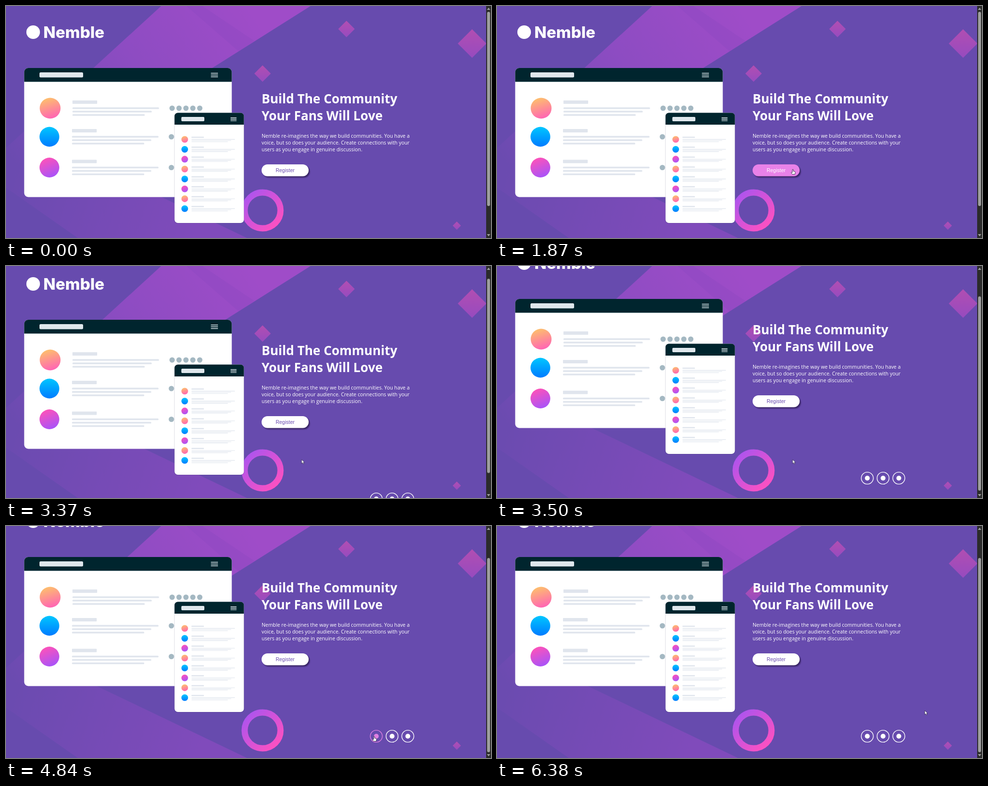
An HTML page that plays this animation: 1000 by 479 pixels, repeating every 6.44 s.

```html
<!DOCTYPE html>
<html lang="en">
<head>
<meta charset="utf-8">
<title>Community landing page</title>
<style>
  html, body { margin: 0; width: 100%; height: 100%; overflow: hidden; background: #674bae; }
  svg { display: block; width: 100%; height: 100%; }
  text { font-family: "Open Sans", sans-serif; fill: #fff; }
  .brand { font: 800 33px Inter, sans-serif; }
  .title { font-size: 26px; font-weight: 700; }
  .copy { font-size: 10.4px; font-weight: 500; }
  .label { font: 10.5px "Liberation Sans", Arial, sans-serif; fill: currentColor; }

  .page, .thumb, .pointer, .arrow, .hand, .button, .label, .icon {
    animation: 6440ms linear infinite;
  }
  .page { --k: -1; }
  .thumb { --k: .845; }
  .page, .thumb { animation-name: scroll; animation-timing-function: step-end; }
  .pointer { animation-name: move; }
  .arrow, .hand { animation-timing-function: step-end; }
  .arrow { animation-name: arrow; }
  .hand { animation-name: hand; }
  .button { animation-name: press; fill: #fff; }
  .label { animation-name: press-label; color: #694baf; }
  .icon { color: #fff; }
  .icon:nth-child(1) { animation-name: first; }
  .icon:nth-child(2) { animation-name: second; }
  .icon:nth-child(3) { animation-name: third; }

  @keyframes scroll {
    0% { transform: translateY(0); }
    51.55% { transform: translateY(calc(5px * var(--k))); }
    52.32% { transform: translateY(calc(17px * var(--k))); }
    52.79% { transform: translateY(calc(29px * var(--k))); }
    53.26% { transform: translateY(calc(41px * var(--k))); }
    53.72% { transform: translateY(calc(52px * var(--k))); }
    54.34% { transform: translateY(calc(60px * var(--k))); }
    55.9%, 100% { transform: translateY(calc(64px * var(--k))); }
  }
  @keyframes move {
    0%, 15.53% { transform: translate(720px, 479px); }
    24.53%, 39.44% { transform: translate(610px, 337px); }
    45.18%, 63.04% { transform: translate(609.5px, 399.5px); }
    72.05% { transform: translate(757px, 432px); }
    75.1%, 77.6% { transform: translate(759px, 434px); }
    82.6%, 85.1% { transform: translate(795px, 435px); }
    90.06%, 93.2% { transform: translate(827px, 434px); }
    99.06%, 100% { transform: translate(882px, 381px); }
  }
  @keyframes arrow {
    0%, 23.6%, 71.7%, 80.9%, 88.35% { visibility: hidden; }
    15.53%, 40.84%, 79.97%, 87.2%, 94.46%, 100% { visibility: visible; }
  }
  @keyframes hand {
    0%, 40.84%, 79.97%, 87.2%, 94.46%, 100% { visibility: hidden; }
    23.6%, 71.7%, 80.9%, 88.35% { visibility: visible; }
  }
  @keyframes press {
    0%, 23.6%, 45%, 100% { fill: #fff; }
    28%, 40.84% { fill: #e882e8; }
  }
  @keyframes press-label {
    0%, 23.6%, 45%, 100% { color: #694baf; }
    28%, 40.84% { color: #fff; }
  }
  @keyframes first {
    0%, 71.7%, 83.5%, 100% { color: #fff; }
    75.1%, 79.97% { color: #e07fe2; }
  }
  @keyframes second {
    0%, 80.9%, 91%, 100% { color: #fff; }
    84.5%, 87.2% { color: #e07fe2; }
  }
  @keyframes third {
    0%, 88.35%, 98.5%, 100% { color: #fff; }
    92%, 94.46% { color: #e07fe2; }
  }
</style>
</head>
<body>
<svg viewBox="0 0 1000 479" preserveAspectRatio="none">
  <defs>
    <linearGradient id="band" gradientUnits="userSpaceOnUse" x1="500" y1="0" x2="30" y2="340">
      <stop stop-color="#9f4cc8"/><stop offset=".45" stop-color="#8d4cc2"/><stop offset="1" stop-color="#6b4bb0"/>
    </linearGradient>
    <linearGradient id="floor" gradientUnits="userSpaceOnUse" x1="400" y1="470" x2="20" y2="330">
      <stop stop-color="#804bbb"/><stop offset="1" stop-color="#6b4bb0"/>
    </linearGradient>
    <linearGradient id="gem" x1="0" y1="0" x2="0" y2="1">
      <stop stop-color="#b14eb2"/><stop offset="1" stop-color="#974bbf"/>
    </linearGradient>
    <linearGradient id="ring" x1="0" y1="0" x2="1" y2="1">
      <stop offset=".1" stop-color="#b054ec"/><stop offset=".9" stop-color="#fb51c2"/>
    </linearGradient>
    <linearGradient id="orange" x1=".35" y1="0" x2=".65" y2="1">
      <stop stop-color="#fdc06c"/><stop offset="1" stop-color="#ff62b6"/>
    </linearGradient>
    <linearGradient id="blue" x1="0" y1="0" x2="0" y2="1">
      <stop stop-color="#00c6ff"/><stop offset="1" stop-color="#007cff"/>
    </linearGradient>
    <linearGradient id="pink" x1=".3" y1="0" x2=".7" y2="1">
      <stop stop-color="#ff52b8"/><stop offset="1" stop-color="#a653fb"/>
    </linearGradient>
    <filter id="soft" x="-20%" y="-50%" width="140%" height="220%"><feGaussianBlur stdDeviation="1.3"/></filter>
  </defs>

  <rect width="1000" height="479" fill="#674bae"/>
  <path d="M0 293L140 308L497 479H148L0 375Z" fill="url(#floor)"/>
  <path d="M320 0H628L140 308L0 330V293Z" fill="url(#band)"/>
  <path d="M372 0H405L512 72L480 94Z" fill="#7e45bb" opacity=".22"/>
  <g id="gems" fill="url(#gem)"></g>
  <circle cx="529" cy="422" r="37" fill="none" stroke="url(#ring)" stroke-width="12.8"/>

  <g class="page">
    <circle cx="56" cy="54" r="14" fill="#fff"/>
    <text class="brand" x="77" y="66">Nemble</text>

    <rect x="37.5" y="128" width="428" height="266.5" rx="8.5" fill="#fff"/>
    <path d="M37.5 156.5V136.5a8.5 8.5 0 0 1 8.5-8.5H457a8.5 8.5 0 0 1 8.5 8.5V156.5Z" fill="#00252e"/>
    <rect x="69" y="137" width="90" height="10.5" rx="2.5" fill="#dfe7ec"/>
    <path d="M422.5 138.7h14.5m-14.5 3.8h14.5m-14.5 3.8h14.5" stroke="#dfe7ec" stroke-width="1.6"/>
    <g id="wide"></g>

    <rect x="346.8" y="220.5" width="144.4" height="228.2" rx="7" fill="#1c2350" opacity=".22"/>
    <rect x="347.5" y="220.5" width="143" height="227.5" rx="7" fill="#fff"/>
    <path d="M347.5 245V227.5a7 7 0 0 1 7-7H483.5a7 7 0 0 1 7 7V245Z" fill="#00252e"/>
    <rect x="361.5" y="229" width="47.5" height="9" rx="2" fill="#dfe7ec"/>
    <path d="M463 230.7h12.3m-12.3 3.1h12.3m-12.3 3.1h12.3" stroke="#dfe7ec" stroke-width="1.4"/>
    <g id="narrow"></g>

    <text class="title" x="527" y="201">Build The Community</text>
    <text class="title" x="527" y="236.3">Your Fans Will Love</text>
    <text class="copy" x="527" y="272">Nemble re-imagines the way we build communities. You have a</text>
    <text class="copy" x="527" y="286">voice, but so does your audience. Create connections with your</text>
    <text class="copy" x="527" y="300">users as you engage in genuine discussion.</text>

    <rect x="529.5" y="329.8" width="97" height="24.5" rx="12.2" fill="#25184a" opacity=".7" filter="url(#soft)"/>
    <rect class="button" x="527" y="327" width="97" height="24.5" rx="12.2"/>
    <text class="label" x="575.5" y="343" text-anchor="middle">Register</text>

    <g id="social"></g>
  </g>

  <rect x="990" width="10" height="479" fill="#2b2b2b"/>
  <path d="M991.5 8L995 3.5L998.500 8ZM991.5 471L995 475.500L998.500 471Z" fill="#9f9f9f"/>
  <rect class="thumb" x="992" y="12" width="6" height="401" rx="3" fill="#9f9f9f"/>

  <g class="pointer">
    <path class="arrow" d="M0 0V8.300L1.900 6.600L3.200 9.400L4.600 8.800L3.400 6H5.900Z" fill="#fff" stroke="#221a3c" stroke-width=".7"/>
    <path class="hand" d="M-1 .8Q0-.6 1 .8V4L4.300 4.800Q5.200 5.100 5 6.300L4.300 10.500H-1L-3.700 6.900Q-3.200 5.300-1 7Z" fill="#fff" stroke="#221a3c" stroke-width=".8"/>
  </g>
</svg>
<script>
  const fill = (id, parts) => { document.getElementById(id).innerHTML = parts.join(""); };
  const disc = (x, y, r, paint) => `<circle cx="${x}" cy="${y}" r="${r}" fill="${paint}"/>`;
  const bar = (x, y, w, h, rx, paint = "#e0e5ed") =>
    `<rect x="${x}" y="${y - h / 2}" width="${w}" height="${h}" rx="${rx}" fill="${paint}"/>`;
  const paints = ["url(#orange)", "url(#blue)", "url(#pink)"];

  fill("gems", [[702, 47.5, 17], [961, 77.5, 29.500], [529, 139.5, 17], [929.5, 453.5, 8.5]].map(
    ([x, y, r]) => `<path d="M${x} ${y - r}l${r} ${r}l${-r} ${r}l${-r} ${-r}Z"/>`));

  fill("wide", [211, 270, 333.5].map((y, i) => {
    const x = i ? 136 : 137;
    const lines = [178.5, 163.5, 149].map((w, n) => bar(x, y + 7 * n, w, 3.6, 1.5));
    const dots = Array.from({ length: i ? 1 : 5 }, (_, n) =>
      disc((i ? 341 : 342.5) + 14.25 * n, y, 5.5, "#a4b8c2"));
    return disc(i ? 89.5 : 91, y, i ? 20.4 : 21.5, paints[i])
      + bar(x, y - 12.5, 51, 7.2, 1) + lines.join("") + dots.join("");
  }));

  fill("narrow", Array.from({ length: 8 }, (_, i) => {
    const y = 275.4 + 20.43 * i;
    const lines = [89.5, 82, 75].map((w, n) => bar(382.5, y + 2.4 * n, w, 1.1, .5));
    return disc(368.5, y, 6.9, paints[i % 3]) + bar(382.5, y - 4.3, 25.5, 2.5, .5) + lines.join("");
  }));

  fill("social", [763.5, 796, 828.5].map(x =>
    `<g class="icon"><circle cx="${x}" cy="498" r="12.4" fill="none" stroke="currentColor" stroke-width="1.4"/>`
    + disc(x, 498, 5, "currentColor") + "</g>"));
</script>
</body>
</html>
```
